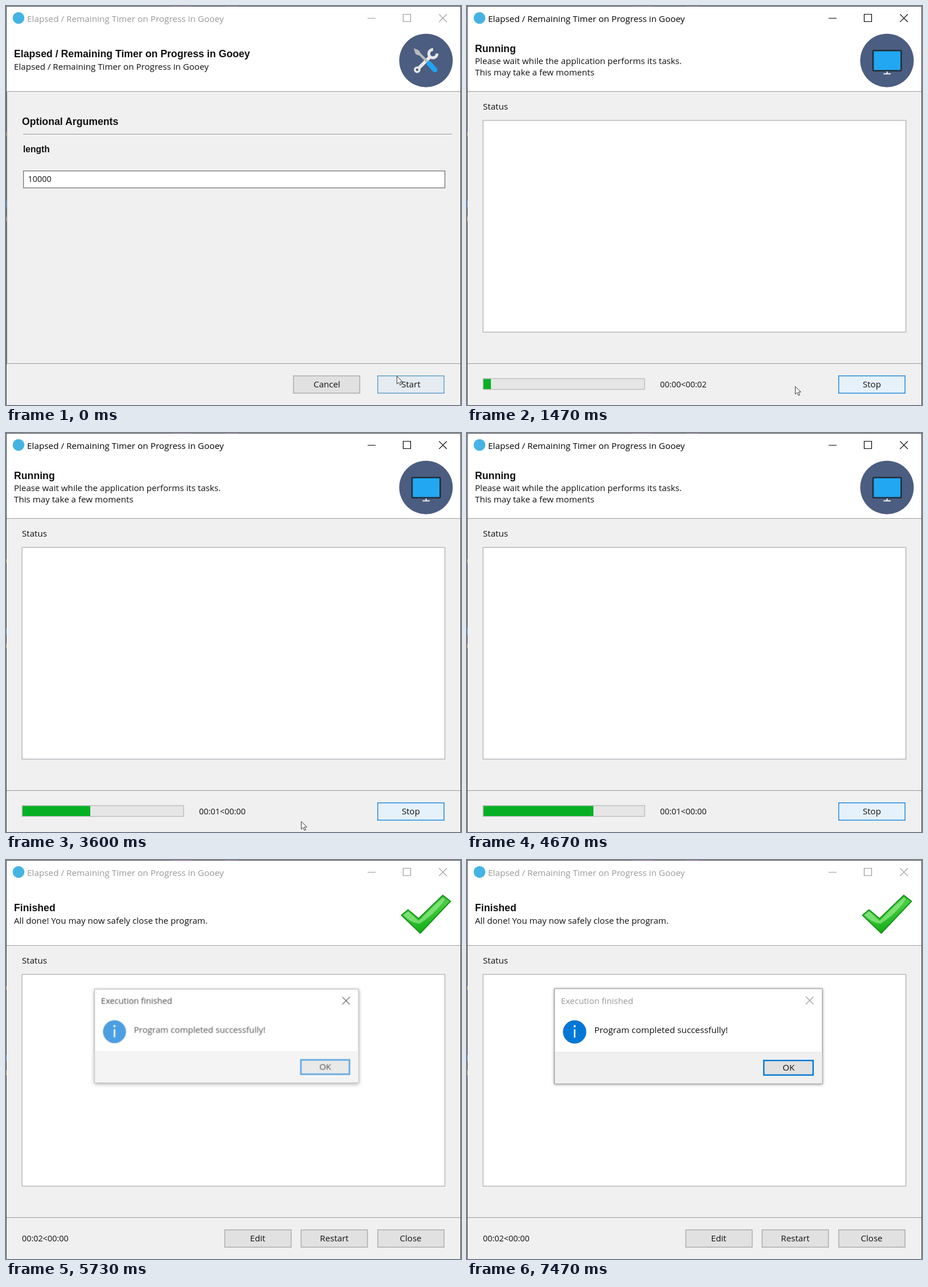
These frames come from a looping animation (799 px wide and 701 px high, 7590 ms). An HTML page:

```html
<!DOCTYPE html>
<html lang="en">
<head>
<meta charset="utf-8">
<title>Progress timer</title>
<style>
  html, body { margin: 0; width: 100%; height: 100%; overflow: hidden; background: #f0f0f0; }
  svg { display: block; width: 799px; height: 701px; }
  text { font: 15.15px "Open Sans", "Noto Sans", sans-serif; fill: #111; }
  .bold { font: bold 17.7px "Liberation Sans", Arial, sans-serif; }
  .label { font-size: 15.6px; }
  .num { font-size: 14.4px; }
  .mid { text-anchor: middle; }
  .line { stroke: #a0a0a0; stroke-width: 1.3; }
  .btn { fill: #e1e1e1; stroke: #adadad; stroke-width: 1.5; }
  .hot { fill: #e5f1fb; stroke: #2589da; }
  .chrome text { font-size: 15.3px; fill: currentColor; }
  .chrome path { fill: none; stroke: currentColor; stroke-width: 1.2; }

  /* Everything shares one 7590 ms clock; hard cuts unless stated */
  .setup, .run, .done, .chrome, .start, .bar, .t0, .t1, .t2,
  .dialog, .caption, .shadow, .cursor {
    animation: 7590ms step-end infinite;
  }
  .setup { animation-name: setup; }
  .run { animation-name: run; }
  .done { animation-name: done; }
  .chrome { animation-name: focus; }
  .start { animation-name: start; }
  .bar { animation-name: bar; }
  .t0 { animation-name: t0; }
  .t1 { animation-name: t1; }
  .t2 { animation-name: t2; }
  .dialog { animation-name: open; animation-timing-function: linear; transform-origin: 388.5px 309.5px; }
  .caption { animation-name: blur; }
  .shadow { animation-name: shade; }
  .cursor { animation-name: move; animation-timing-function: linear; }

  @keyframes setup { 0% { visibility: visible } 2.63%, 100% { visibility: hidden } }
  @keyframes run { 0% { visibility: hidden } 2.63% { visibility: visible } 72.85%, 100% { visibility: hidden } }
  @keyframes done { 0% { visibility: hidden } 72.85%, 100% { visibility: visible } }
  @keyframes focus { 0% { color: #999 } .92% { color: #000 } 72.06%, 100% { color: #999 } }
  @keyframes start {
    0% { fill: #e4ebf1; stroke: #62a0cd }
    .92%, 100% { fill: #e5f1fb; stroke: #2589da }
  }
  @keyframes t0 { 0% { opacity: 0 } 13.17% { opacity: 1 } 26.35%, 100% { opacity: 0 } }
  @keyframes t1 { 0% { opacity: 0 } 26.35% { opacity: 1 } 39.52%, 100% { opacity: 0 } }
  @keyframes t2 { 0% { opacity: 0 } 39.52%, 100% { opacity: 1 } }
  @keyframes bar {
    0% { width: 0 } 13.17% { width: 2px } 15.81% { width: 7px } 19.36% { width: 13px }
    22% { width: 19px } 23.71% { width: 25px } 26.35% { width: 36px } 31.62% { width: 48px }
    35.96% { width: 60px } 39.52% { width: 72px } 41.23% { width: 84px } 43.87% { width: 96px }
    45.71% { width: 108px } 47.43% { width: 119px } 50.06% { width: 133px } 51.77% { width: 145px }
    53.62% { width: 159px } 56.25% { width: 171px } 58.89% { width: 183px } 61.52% { width: 193px }
    63.24% { width: 203px } 65.87% { width: 211px } 68.51% { width: 220px } 70.22%, 100% { width: 228px }
  }
  @keyframes open {
    0%, 73.3% { opacity: 0; transform: translate(-4px, 0) scale(.95) }
    75.49% { opacity: .71; transform: translate(-1.5px, -.5px) scale(.985) }
    76.41% { opacity: .9; transform: translate(-.5px, 0) scale(.995) }
    78.12%, 100% { opacity: 1; transform: none }
  }
  @keyframes blur { 0% { color: #000 } 98.41%, 100% { color: #999 } }
  @keyframes shade {
    0% { filter: drop-shadow(0 2px 4px rgba(0, 0, 0, .45)) }
    98.41%, 100% { filter: drop-shadow(0 1px 2.5px rgba(0, 0, 0, .4)) }
  }
  @keyframes move {
    0%, 12.4% { transform: translate(686px, 650px); opacity: 1 }
    19.36%, 28.06% { transform: translate(576px, 668px) }
    33.33% { transform: translate(567px, 671px) }
    38.6% { transform: translate(541px, 671px) }
    47.42%, 54.4% { transform: translate(518px, 682px); opacity: 1 }
    54.41% { transform: translate(518px, 701px); opacity: 0 }
    83.38% { transform: translate(315px, 690px); opacity: 0 }
    83.39% { transform: translate(315px, 690px); opacity: 1 }
    85.8% { transform: translate(302px, 480px) }
    88.2% { transform: translate(260px, 376px) }
    90.6% { transform: translate(188px, 470px) }
    93.14% { transform: translate(123px, 686px) }
    94.85% { transform: translate(122px, 692px); opacity: 1 }
    94.86%, 100% { transform: translate(122px, 701px); opacity: 0 }
  }
</style>
</head>
<body>
<svg viewBox="0 0 799 701">
  <defs>
    <rect id="button" x=".75" y=".75" width="116.5" height="30.5"/>
    <linearGradient id="green" x1="0" y1="0" x2=".35" y2="1">
      <stop offset="0" stop-color="#128a18"/>
      <stop offset=".45" stop-color="#48cf42"/>
      <stop offset="1" stop-color="#12ad12"/>
    </linearGradient>
  </defs>

  <!-- Window -->
  <rect width="799" height="701" fill="#f0f0f0"/>
  <rect width="799" height="150" fill="#fff"/>
  <path class="line" d="M1 150.3H798M1 628.3H798"/>
  <path stroke="#fff" d="M1 151.5H798M1 629.5H798"/>
  <path d="M.5 701V.5H798.5V701" fill="none" stroke="#424242"/>
  <path d="M290 .5h35M385 .5h22" stroke="#6b4a68"/>
  <path d="M.5 222v6M.5 370v8" stroke="#b58a3c"/>
  <path d="M.5 342v12" stroke="#2f83cf"/>

  <g class="chrome">
    <circle cx="22" cy="21" r="10.3" fill="#45b3e3"/>
    <text x="37" y="27.6">Elapsed / Remaining Timer on Progress in Gooey</text>
    <path d="M635 21.5h14M697.5 14.5h13v13h-13zM760.5 14.5l13.5 13.5M774 14.5l-13.5 13.5"/>
  </g>

  <!-- Settings page -->
  <g class="setup">
    <text class="bold" x="14" y="90">Elapsed / Remaining Timer on Progress in Gooey</text>
    <text x="14" y="111.6">Elapsed / Remaining Timer on Progress in Gooey</text>
    <circle cx="737.5" cy="95.7" r="47" fill="#4b5d80"/>
    <g fill="none">
      <path d="M725 109L745 89" stroke="#e9e9e9" stroke-width="6"/>
      <circle cx="722" cy="112" r="4" stroke="#e9e9e9" stroke-width="3.6"/>
      <path d="M750 76.5a7.3 7.3 0 1 0 7 7" stroke="#e9e9e9" stroke-width="5"/>
      <path d="M723 81L742 100" stroke="#b9bbbd" stroke-width="4.5"/>
      <path d="M716 74l9 4 3 5-4 4-5-3z" fill="#b9bbbd"/>
      <path d="M743 101L753 112" stroke="#21a3f1" stroke-width="9" stroke-linecap="round"/>
    </g>
    <path class="line" d="M1.6 151V628"/>
    <text class="bold" x="28" y="208.5">Optional Arguments</text>
    <path class="line" d="M30 225.3H783"/>
    <path stroke="#fff" d="M30 226.5H783"/>
    <text class="bold label" x="30" y="256.6">length</text>
    <rect x="30.7" y="289.7" width="740" height="29.8" fill="#fff" stroke="#7a7a7a" stroke-width="1.4"/>
    <text class="num" x="38.5" y="308.8">10000</text>
    <use class="btn" href="#button" x="504" y="649"/>
    <text class="mid" x="563.5" y="669.8">Cancel</text>
    <use class="btn start" href="#button" x="652" y="649"/>
    <text class="mid" x="711" y="669.8">Start</text>
  </g>

  <!-- Status box, shared by the two later pages -->
  <g id="status">
    <g class="run">
      <text x="28" y="181.5">Status</text>
      <rect x="28.2" y="201" width="742.5" height="372" fill="#fff" stroke="#b4b6ba" stroke-width="1.4"/>
    </g>
    <g class="done">
      <text x="28" y="181.5">Status</text>
      <rect x="28.2" y="201" width="742.5" height="372" fill="#fff" stroke="#b4b6ba" stroke-width="1.4"/>
    </g>
  </g>

  <!-- Running page -->
  <g class="run">
    <text class="bold" x="14" y="81">Running</text>
    <text x="14" y="102.3">Please wait while the application performs its tasks.</text>
    <text x="14" y="122.3">This may take a few moments</text>
    <circle cx="737.5" cy="95.7" r="47" fill="#4b5d80"/>
    <rect x="713" y="78.2" width="49.5" height="35.6" rx="2" fill="#22a7f2" stroke="#212d38" stroke-width="2.6"/>
    <path d="M737.7 115v4M731.5 119.3h12.5" stroke="#eee" stroke-width="2"/>
    <rect x="28.2" y="654.6" width="283.6" height="19" fill="#e6e6e6" stroke="#bcbcbc" stroke-width="1.4"/>
    <rect class="bar" x="29" y="655.3" width="0" height="17.7" fill="#06b025"/>
    <text class="num t0" x="339" y="669.6">00:00&lt;00:02</text>
    <text class="num t1" x="339" y="669.6">00:00&lt;00:01</text>
    <text class="num t2" x="339" y="669.6">00:01&lt;00:00</text>
    <use class="btn hot" href="#button" x="652" y="649"/>
    <text class="mid" x="711" y="669.8">Stop</text>
  </g>

  <!-- Finished page -->
  <g class="done">
    <text class="bold" x="14" y="90">Finished</text>
    <text x="14" y="111.6">All done! You may now safely close the program.</text>
    <path d="M694.5 97L706 87.5 724.5 103 767 62 780.5 72.5 727.5 128.5z"
          fill="url(#green)" stroke="#17931a" stroke-width="2" stroke-linejoin="round"/>
    <path d="M698 96.5L706 90.5 724.5 107 767 65.5 771 69Q752 96 726 112 710 110 698 96.5z"
          fill="#a4f09a" opacity=".6"/>
    <text class="num" x="28" y="669.6">00:02&lt;00:00</text>
    <g class="btn">
      <use href="#button" x="383.5" y="649"/>
      <use href="#button" x="517.5" y="649"/>
      <use href="#button" x="652" y="649"/>
    </g>
    <text class="mid" x="442" y="669.8">Edit</text>
    <text class="mid" x="576.5" y="669.8">Restart</text>
    <text class="mid" x="710.5" y="669.8">Close</text>
  </g>

  <g class="dialog">
    <rect class="shadow" x="153.5" y="226" width="470.5" height="167" fill="#fff" stroke="#909090"/>
    <path d="M154 338H623.5V392.5H154z" fill="#f0f0f0"/>
    <path d="M154 338H623.5" stroke="#dfdfdf"/>
    <g class="caption chrome-text" fill="currentColor">
      <text x="165" y="252.6" style="font-size:14.9px;fill:currentColor">Execution finished</text>
      <path d="M595 240l13.5 13.5M608.5 240L595 253.5" stroke="currentColor" stroke-width="1.1"/>
    </g>
    <circle cx="189" cy="302" r="20" fill="#0078d7" stroke="#1368ae"/>
    <path d="M189 297.5v14.5" stroke="#fff" stroke-width="2.6"/>
    <circle cx="189" cy="292" r="1.9" fill="#fff"/>
    <text x="223.5" y="303.7" style="font-size:15.35px">Program completed successfully!</text>
    <rect x="521.2" y="352.2" width="86.6" height="25.6" fill="#e1e1e1" stroke="#0078d7" stroke-width="2.4"/>
    <text class="mid" x="564.7" y="370.3">OK</text>
  </g>

  <path class="cursor" d="M.5 .5V14L3.7 11 6 16.2 8.3 15.2 6 10.2H10.3z" fill="#fff" stroke="#222" stroke-width=".9"/>
</svg>
</body>
</html>
```
